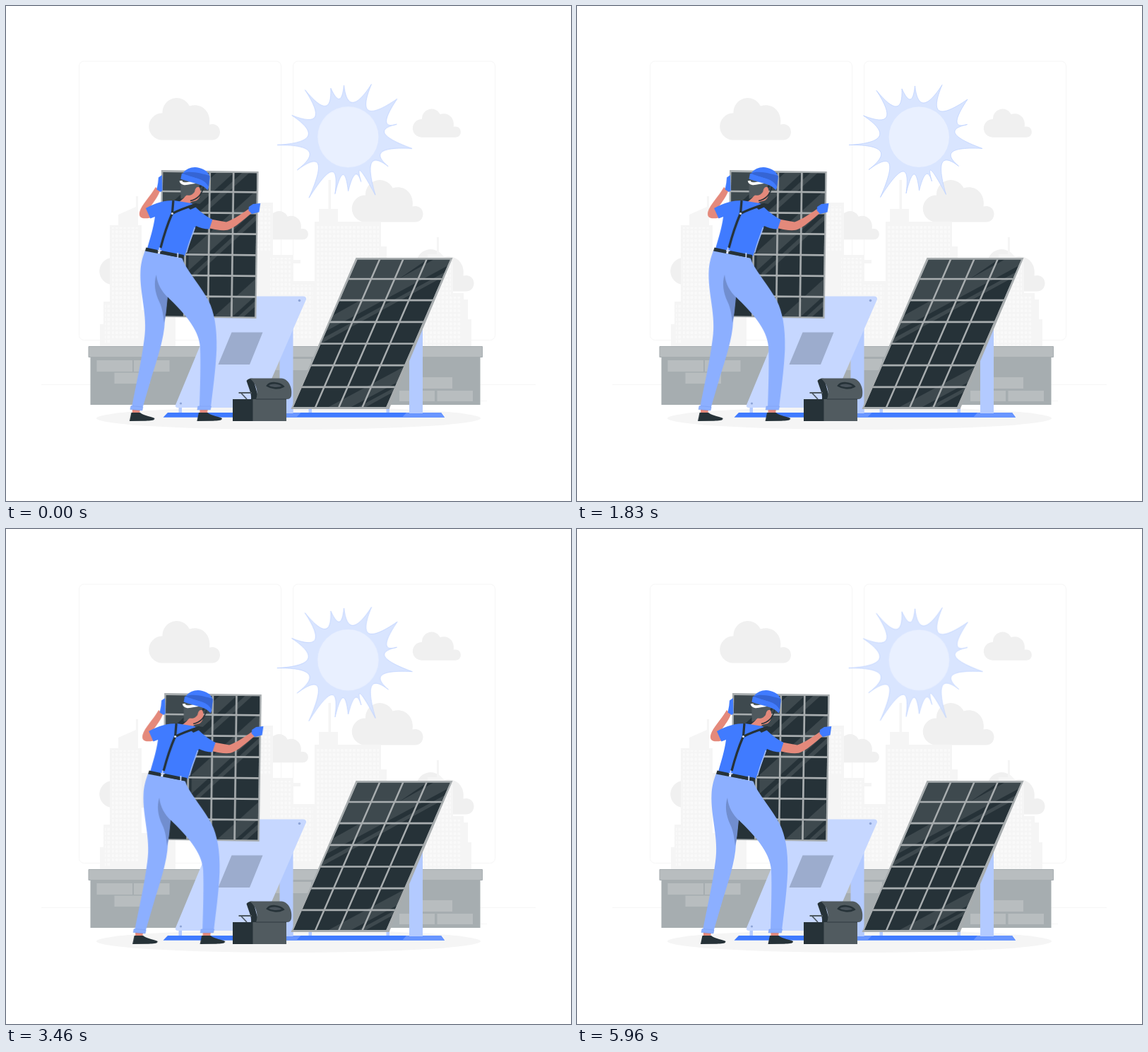
Write an HTML page that moves like this. It is 800x700 px and loops after 6000 ms.

```html
<!DOCTYPE html>
<html lang="en">
<head>
<meta charset="utf-8">
<title>Solar panel installation</title>
<style>
  html, body { margin: 0; width: 100%; height: 100%; overflow: hidden; background: #fff; }
  svg { display: block; width: 100%; height: 100%; }
  .sun { transform-origin: 479.6px 191px; animation: beat 6s linear -60ms infinite; }
  .worker { animation: shake 6s linear -60ms infinite; }
  @keyframes beat {
    0%, 30%, 40%, 60%, 100% { transform: scale(1); }
    10%, 50% { transform: scale(1.1); }
  }
  @keyframes shake {
    0%, 100% { transform: translateX(0); }
    10%, 90% { transform: translateX(-1.4px); }
    20%, 80% { transform: translateX(2.8px); }
    30%, 50%, 70% { transform: translateX(-5.6px); }
    40%, 60% { transform: translateX(5.6px); }
  }
  .blue { fill: #407bff; }
  .pale { fill: #b3caff; }
  .trousers { fill: #8cafff; }
  .skin { fill: #e4897b; }
  .dark { fill: #263238; }
  .steel { fill: #515b60; }
  .frame { fill: #a8adaf; }
  .grid { fill: none; stroke: #a8adaf; stroke-width: 2.7; }
  .glare { fill: #fff; opacity: .11; }
  .brick { fill: #b8bdbf; }
</style>
</head>
<body>
<svg viewBox="0 0 800 700" xmlns="http://www.w3.org/2000/svg">
  <defs>
    <path id="cloud" d="M20 59.5A19 19 0 1 1 20.500 21.500A20.300 20.300 0 0 1 59 11.500C74 6 90 18 87 37.500C96 35 102 41 102 48C102 55 97 59.500 91 59.500Z"/>
    <pattern id="windows" width="5.7" height="6.2" patternUnits="userSpaceOnUse">
      <rect x="1" y="1" width="3.7" height="4" rx=".8" fill="#fafafa"/>
    </pattern>
    <clipPath id="rightFace"><path d="M0 0H131.500V208.500H0Z"/></clipPath>
    <clipPath id="heldFace"><path d="M0 0H133V203.500H0Z"/></clipPath>
  </defs>

  <g fill="none" stroke="#f6f6f6">
    <rect x="103.500" y="78" width="286" height="394.500" rx="7"/>
    <rect x="406.500" y="78" width="286" height="394.500" rx="7"/>
    <path d="M50 535.500H750M672 558.500H681"/>
  </g>

  <g fill="#f0f0f0">
    <use href="#cloud" x="201" y="130"/>
    <use href="#cloud" transform="translate(575 145.500) scale(.675)"/>
    <use href="#cloud" x="488.500" y="246"/>
    <use href="#cloud" transform="translate(359 290) scale(.675)"/>
    <use href="#cloud" x="131" y="334.500"/>
    <use href="#cloud" x="560.500" y="344"/>
  </g>

  <g fill="#f5f5f5">
    <path d="M133 482V450H138V418H147V310H159V295L184 284V269H187V310H192V482Z"/>
    <path d="M192 482V430H240V482Z"/>
    <path d="M340 482V278H378V352H406V359H417V364H406V389H437V305H443V287H456.500V246H460V287H470V305H531V340H539V482Z"/>
    <path d="M555 482V362H597V351H610V327H613V348L620 354V362H633V406H648V415H654V443H659V482Z"/>
  </g>
  <g fill="url(#windows)">
    <path d="M150 313H189V470H150ZM140 422H148V478H140ZM344 283H374V346H344ZM374 356H403V470H374ZM404 394H435V470H404ZM440 309H528V478H440ZM590 365H630V480H590ZM628 411H645V480H628Z"/>
  </g>

  <rect x="119.500" y="496" width="552" height="68" fill="#a6adb0"/>
  <rect x="117" y="481.500" width="557.500" height="15" fill="#b8bdbf"/>
  <path d="M117 481.500H674.500V496.500H117Z" fill="none" stroke="#a6adb0"/>
  <path class="brick" d="M128.500 501H179V517H128.500ZM181 501H231.500V517H181ZM153.500 518.500H204V534H153.500ZM382 499H432V515H382ZM582 525H632V541H582ZM557 544H607V559H557ZM610.500 544H661V559H610.500Z"/>

  <ellipse cx="400" cy="583" rx="272" ry="16" fill="#f5f5f5"/>

  <g class="pale">
    <path d="M387.500 416H406.500V576H387.500ZM571 440H590V576H571Z"/>
    <path d="M244.500 560H249V576H244.500ZM428.500 560H433V576H428.500ZM538.500 560H543V576H538.500Z"/>
  </g>
  <path class="blue" d="M229 575H616L621 581.700H222.500Z"/>
  <path d="M567 575H616L621 581.700H561ZM394 575H417.500L411 581.700H394Z" fill="#6996ff"/>
  <path class="pale" d="M571 570H590V576H571ZM387.500 570H406.500V576H387.500Z"/>

  <path d="M309 410.500H421C424 410.500 426 413 424.500 416L360 564Q358 568 354 568H243Q238.500 568 240.500 563L302 415Q304 410.500 309 410.500Z" fill="#c6d7ff"/>
  <path d="M319.500 461.500H363.500L345 507H300.500Z" fill="#9caccd"/>
  <g fill="#8ea5d8"><circle cx="415.500" cy="416.500" r="1.800"/><circle cx="247.500" cy="562" r="1.600"/></g>

  <g class="sun">
    <path id="rays" fill="#d9e5ff" stroke="#b9ceff" stroke-width=".7"/>
    <circle cx="484.300" cy="185.300" r="42.700" fill="#e9f0ff"/>
  </g>

  <path class="frame" d="M495.500 356H632.500L542.500 570H403.500Z"/>
  <g transform="matrix(1 0 -.435 1 497.500 358.500)">
    <g clip-path="url(#rightFace)">
      <path class="dark" d="M0 0H131.500V208.500H0Z"/>
      <path class="glare" d="M0 0H99L40 57H0ZM131.500 0V9L0 101V79L108 0ZM131.500 18V25L0 119V111ZM131.500 152V174L82 208.500H50ZM131.500 181V188L103 208.500H92Z"/>
    </g>
    <path class="grid" d="M31.500 0V208.500M64.700 0V208.500M98 0V208.500M0 27.500H131.500M0 57.700H131.500M0 88.300H131.500M0 119H131.500M0 149.600H131.500M0 180.300H131.500"/>
  </g>

  <path d="M347 556C348 549 344 541 340.500 530Q344 526 350 527L358 556Z" class="dark"/>
  <path class="steel" d="M345 526.500H390C400 527 406 540 404 551Q403 556 398 556H354C358 546 354 533 345 526.500Z"/>
  <path class="steel" d="M349 556H397V587H349Z"/>
  <path class="dark" d="M321 556H349.500V587H321Z"/>
  <path d="M354 556H397" stroke="#263238" stroke-width=".8"/>
  <path d="M370 537C374 531.500 387 532 392.500 538C385 542 375 540.500 370 537Z" fill="#48525a" stroke="#263238" stroke-width="2.600"/>
  <path d="M329.500 547H348M333 547.500L341 556" fill="none" stroke="#4d5860" stroke-width="1.800"/>

  <g class="worker">
    <path class="frame" d="M220 232L357.700 234L354.500 442L217.500 439.800Z"/>
    <g transform="matrix(1 .01 -.014 1 222.300 235)">
      <g clip-path="url(#heldFace)">
        <path class="dark" d="M0 0H133V203.500H0Z"/>
        <path class="glare" d="M0 0H58L0 56ZM76 0H100L0 94V70ZM112 0H122L0 113V104ZM133 24V51L38 139V112ZM133 59V67L45 149V142ZM133 150V174L101 203.500H75ZM133 181V189L117 203.500H109Z"/>
      </g>
      <path class="grid" d="M33 0V203.500M66.500 0V203.500M100 0V203.500M0 27H133M0 56.800H133M0 86.300H133M0 116H133M0 145.500H133M0 175H133"/>
    </g>

    <path class="skin" d="M212 256C204 270 192 281 189.300 291C187.500 299 192 302 205 299.500L203 286C207 280 214 272 218 262Z"/>
    <path class="blue" d="M221 239L216 242.500L215.300 250L213.500 259.500L219 263L221.500 261Z"/>
    <path class="skin" d="M290 301.500L312 305.500C322 302 334 294 343.500 287L347.500 293C338 301 324 314 314 316.800C305 318 296 316 287 314Z"/>
    <path class="blue" d="M344 284L350 280L360.300 279L358.500 291.500L348 294L343.500 289Z"/>

    <path class="skin" d="M243 278.500C250 274 254 270 256 265L272 254C277 258 277 271 270 275C265 277 262 275 260 281L252 284Z"/>
    <path class="blue" d="M198 286C212 278 225 275 238 275L263 279C272 288 282 297 292.500 302L288 315.500C281 315.500 274 313.500 269 311C265 322 258 338 253 354L200 343C204 329 209 314 211 298L204.500 300.500Z"/>
    <path d="M267.500 313C264 324 259 335 255.500 349" fill="none" stroke="#a3bfff" stroke-width="1.500"/>

    <path class="dark" d="M257 284L268 279L275 280L270 284L261 288Z"/>
    <g fill="none" stroke="#263238" stroke-width="3.200">
      <path d="M237 275L235.500 293Q226 315 219 342"/>
      <path d="M235.500 293.500C246 288 258 284 270 280"/>
    </g>
    <circle cx="235.500" cy="293.500" r="1.600" fill="#dfe8ff"/>

    <path d="M247.500 247L275 245C278 252 273 256 269 259C267 265 262 269 256 267.500C252 271 249 273 247.500 272.500Z" fill="#4f595e"/>
    <ellipse class="skin" cx="270.800" cy="261.500" rx="3.200" ry="5.500" transform="rotate(12 271 261)"/>
    <path d="M280 255C278 265 273 273 261 275.500" fill="none" stroke="#263238" stroke-width="1.500"/>
    <path d="M247.500 247C249 255 261 249.500 272 248.500" fill="none" stroke="#fff" stroke-width="3.800"/>
    <path class="blue" d="M251 236C256 229.500 265 226.500 274 229C283 231 289 237 288.700 244L286.500 258C276 249 258 249 248 243Z"/>
    <path d="M250 236.500C260 232 278 237 288.700 240L287 256C280 243 263 243 250 236.500Z" fill="#3565d4"/>
    <path class="blue" d="M249 236.500C260 244 281 241 287 256L285.700 260.500C277 250 260 250 247.500 244.500Z"/>

    <path class="trousers" d="M197 346L252 357V363C259 377 276 397 287 417C295 433 299 455 298.300 485C297 515 293 542 290 568H274C275 539 276 505 275 482C273 456 251 433 228.500 411L225 446C224 470 214 500 207 522L193 570L178 568C183 541 192 503 196 470C201 438 189 406 190.500 375C191 363 194 354 197 346Z"/>
    <path d="M213 380C209 392 211 405 217 418C222 428 223 440 224 448C227 437 227.500 425 229 412C221 404 214 393 213 380Z" fill="#718ecf"/>
    <path class="skin" d="M179 569H190.500L189 576H179ZM274.500 569H286L285 576H274.500Z"/>
    <g class="trousers" stroke="#779bed" stroke-width=".5">
      <path d="M177 565.500L194 567L193 572L176 570.500Z"/>
      <path d="M272 566L290.500 566L289.500 571L271 571Z"/>
    </g>
    <path id="shoe" class="dark" d="M177.500 575H190C196 580 207 580.500 210.500 583C210.500 587 204 586 198 586.700L175 587Z"/>
    <use href="#shoe" x="95.500"/>

    <path class="dark" d="M198.500 341.500L216 345.200L215 350L197 346.500ZM218.500 345.500L243 350.500L242 355L218 350.500ZM244.500 350.500L252 352V363L249.500 356.500L244 355.500Z"/>
    <path d="M217.500 341.500V348.500M215 345.500L220.500 346M243.300 349V356" fill="none" stroke="#d3e0ff" stroke-width="1.600"/>
  </g>
</svg>
<script>
  // Ray tips, each followed by the hollow before the next tip.
  const points = [
    385, 196.5, 428, 184,   405.5, 155, 438, 157,   424, 119.5, 452, 142,   460, 117, 472, 132,
    478.5, 113, 491, 137,   517, 111.5, 513, 148,   553, 132, 538, 163,     552.5, 167.5, 536, 181,
    574, 201.5, 532, 206,   540.5, 226.5, 517, 222, 522.5, 266.5, 502, 233, 502.5, 248, 494, 238,
    484.5, 261, 477, 238,   466, 265, 461, 234,     429.5, 270.5, 442, 223, 413, 231.5, 429, 205
  ];
  const at = i => points[i % points.length];

  // Cubic controls from tip a to tip b that pass through hollow v.
  function controls(i, axis) {
    const a = at(i + axis), v = at(i + 2 + axis), b = at(i + 4 + axis);
    const mid = (v - (a + b) / 8) / 0.75, spread = 0.17 * (a - b);
    return [mid + spread, mid - spread, b];
  }

  let path = `M${at(0)} ${at(1)}`;
  for (let i = 0; i < points.length; i += 4) {
    const x = controls(i, 0), y = controls(i, 1);
    path += 'C' + x.map((value, k) => `${value} ${y[k]}`).join(' ');
  }
  document.getElementById('rays').setAttribute('d', path + 'Z');
</script>
</body>
</html>
```
